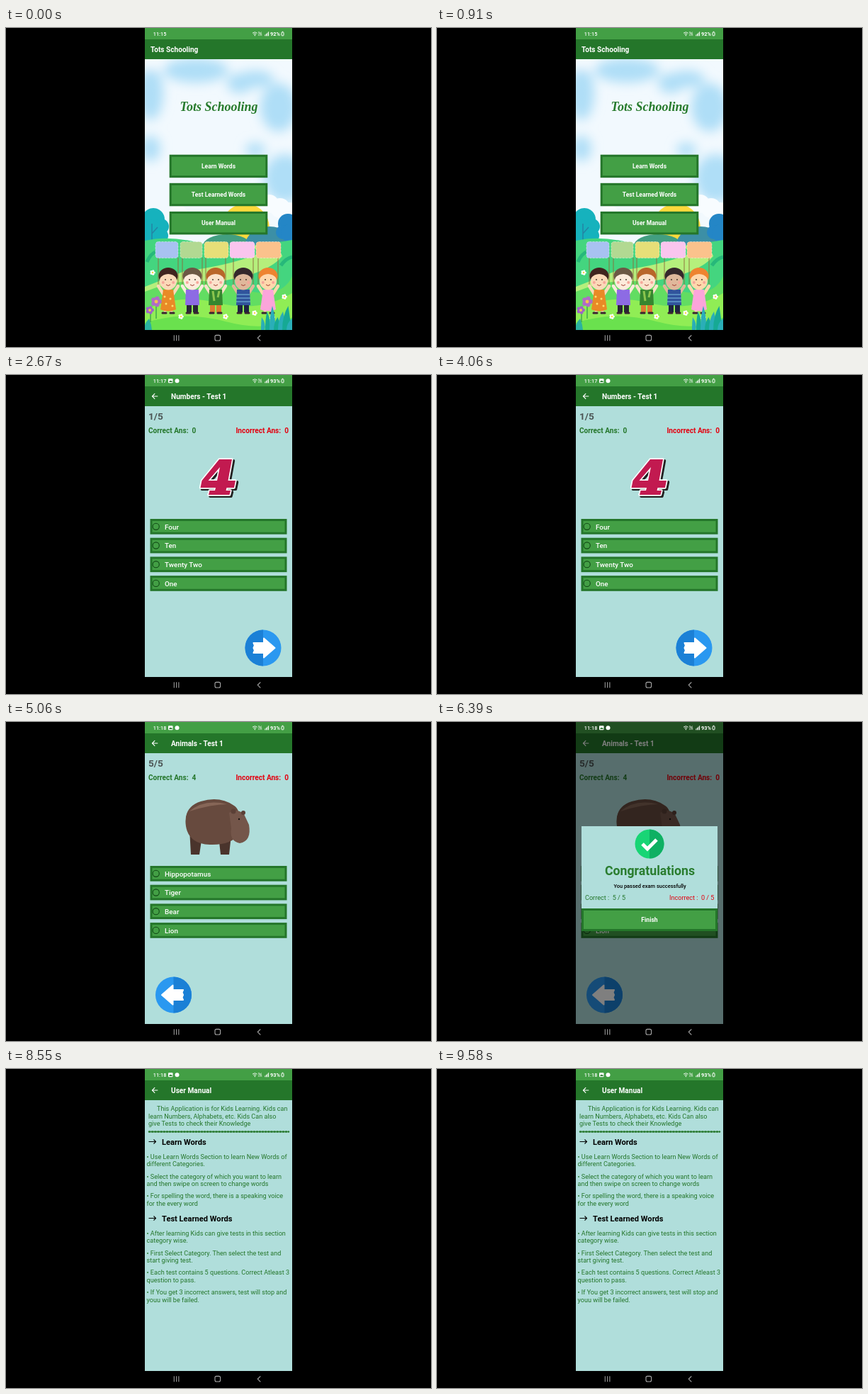
Animation of 600 by 450 pixels, one loop 9.61 s. Source, as an HTML page:

```html
<!DOCTYPE html>
<html lang="en">
<head>
<meta charset="utf-8">
<title>Tots Schooling</title>
<style>
html, body { margin: 0; width: 100%; height: 100%; overflow: hidden; background: #000; }
svg { display: block; width: 600px; height: 450px; font-family: Roboto, sans-serif; }
text { white-space: pre; }
</style>
</head>
<body>
<svg id="stage" viewBox="0 0 600 450"></svg>
<script>
const LOOP = 9610, NAME = 'Tots Schooling';
const LEAF = '#439f45', PINE = '#24762a', TEAL = '#b0dedb', RED = '#e3000f';

const rect = (x, y, w, h, fill, more = '') => `<rect x="${x}" y="${y}" width="${w}" height="${h}" fill="${fill}" ${more}/>`;
const disc = (x, y, r, fill, more = '') => `<circle cx="${x}" cy="${y}" r="${r}" fill="${fill}" ${more}/>`;
const oval = (x, y, rx, ry, fill, more = '') => `<ellipse cx="${x}" cy="${y}" rx="${rx}" ry="${ry}" fill="${fill}" ${more}/>`;
const path = (d, fill, more = '') => `<path d="${d}" fill="${fill}" ${more}/>`;
const line = (d, color, width = 1, more = '') => path(d, 'none', `stroke="${color}" stroke-width="${width}" ${more}`);
const text = (x, y, size, fill, str, weight = 400, anchor = 'start', more = '') =>
  `<text x="${x}" y="${y}" font-size="${size}" fill="${fill}" font-weight="${weight}" text-anchor="${anchor}" ${more}>${str}</text>`;
const each = (list, fn) => list.map(fn).join('');
const framed = (x, y, w, h) =>
  rect(x + 1.5, y + 1.5, w - 3, h - 3, LEAF, `stroke="${PINE}" stroke-width="3"`);

function status(time, level, alerts) {
  let s = text(207.8, 11, 7.3, '#fff', time, 500);
  if (alerts) {
    s += rect(229, 5.2, 6.5, 6, '#fff', 'rx="1"') + path('M230 10l1.8-2.4 1.2 1.2 .8-.8 1.2 2z', PINE) +
      disc(241.5, 8.2, 3, '#fff');
  }
  s += line('M348 7.2q3.3-2.8 6.6 0M349.4 8.8q1.9-1.6 3.8 0', '#fff', 0.9) + disc(351.4, 10.4, 0.8, '#fff');
  s += text(356, 8, 3.4, '#fff', 'Vo)', 500) + text(356, 11.4, 3.4, '#fff', 'LTE', 500);
  s += each([0, 1, 2, 3], i => rect(365.3 + i * 1.6, 9.5 - i * 1.4, 1, 1.8 + i * 1.4, '#fff'));
  return s + text(373, 11, 7.4, '#fff', level + '%', 700) +
    rect(389, 6, 3, 4.8, 'none', 'rx=".7" stroke="#fff" stroke-width="1"') + rect(389.8, 4.8, 1.4, 1, '#fff');
}

function header(title, back) {
  return rect(196, 0, 208, 16, LEAF) + rect(196, 16, 208, 28, PINE) +
    (back ? line('M214.3 30H206.5M210.2 26.2L206.4 30l3.8 3.8', '#fff', 1.1) : '') +
    text(back ? 233 : 204, 34, 10.1, '#fff', title, 700);
}

const page = title => rect(196, 44, 208, 382, TEAL) + header(title, true);

const nav = each([237.3, 240.6, 243.9], x => line(`M${x} 433.3v8`, '#aaa', 1)) +
  rect(295, 433.4, 7.6, 7.6, 'none', 'rx="2" stroke="#aaa" stroke-width="1.1"') +
  line('M359.3 433.3l-4 4 4 4', '#aaa', 1.1);

// Home scenery
function child(x, hair, skin, top, legs, dress) {
  const face = each([-4, 4], d => disc(x + d, 355, 0.9, '#3a2a22') + disc(x + d * 1.8, 359, 2, '#f5a79a'));
  return line(`M${x - 14} 324V364M${x + 14} 324V364`, '#8d6a3c', 0.9) +
    line(`M${x - 7} 375L${x - 14} 364M${x + 7} 375L${x + 14} 364`, skin, 4.5, 'stroke-linecap="round"') +
    line(`M${x - 4.5} 388V401M${x + 4.5} 388V401`, dress ? skin : legs, dress ? 3.5 : 7) +
    line(`M${x - 8} 402h5M${x + 3} 402h5`, '#3a2630', 3, 'stroke-linecap="round"') +
    path(dress ? `M${x - 7} 369h14l4 28q-11 5-22 0z` : `M${x - 9} 369h18l1 22h-20z`, top) +
    oval(x, 350, 13.5, 12, hair) + oval(x, 357, 12, 12.5, skin) +
    path(`M${x - 12} 353q2-12 12-12t12 12q-5-6-12-6t-12 6z`, hair) + face +
    line(`M${x - 3} 362q3 3 6 0`, '#a33c32', 1);
}

const sign = (x, w, color) =>
  rect(x, 301.5, w, 23, color, 'rx="4" stroke="#fff" stroke-opacity=".4" stroke-width="1" stroke-dasharray="3 1.5"');

const flower = (x, y, r, color, core) =>
  each([0, 1, 2, 3, 4], i => disc(x + r * Math.cos(i * 1.257), y + r * Math.sin(i * 1.257), r * 0.7, color)) +
  disc(x, y, r * 0.55, core);

const blade = (x, y, lean, height, color) =>
  path(`M${x - 4} ${y}q0-${height * 0.6} ${4 + lean}-${height}q${5 - lean / 2} ${height * 0.5} 4 ${height}z`, color);

function scenery() {
  const blue = [[204, 92, 18, 38], [268, 60, 46, 17], [330, 78, 18, 14], [385, 112, 26, 34], [352, 72, 26, 12],
    [394, 212, 30, 34], [352, 172, 14, 10], [204, 170, 14, 18]];
  const crown = color => c => disc(...c, color);
  let s = rect(196, 44, 208, 382, '#f2f9fe') +
    `<g filter="url(#soft)">${each(blue, c => oval(...c, '#afdef7'))}${oval(206, 50, 12, 9, '#f7fbfe')}</g>`;
  s += each([[357, 254, 12], [372, 248, 13], [387, 254, 14], [400, 258, 12], [243, 264, 14]], crown('#f8fcff'));
  s += disc(338, 282, 34, '#ffd93c');
  s += oval(312, 307, 34, 16, '#429f80') + oval(372, 306, 34, 26, '#3c8fa6');
  s += each([[208, 270, 16], [219, 280, 11], [202, 288, 18], [218, 293, 11]], crown('#16b2bd'));
  s += line('M206 304V276M206 290l8-9', '#2484a4', 1.5);
  s += each([[398, 276, 14], [391, 288, 10], [403, 290, 14]], crown('#2486c6'));
  s += path('M196 300Q230 292 272 303T404 299V426H196z', '#44d57f') +
    path('M318 303Q362 307 353 320Q310 336 252 343L196 365V385Q250 366 310 356T390 322Q389 309 318 303z', '#b5ef7c') +
    path('M196 372Q262 345 325 366T404 350V426H196z', '#62dd62') +
    path('M196 398Q242 374 300 388T404 374V426H196z', '#90ed55') +
    path('M196 416Q250 398 310 414T404 408V426H196z', '#6ae14e') +
    line('M199 330q5-12 14-15M388 335q7-10 16-12', '#27b87a', 5);
  const signs = [[211, 32, '#a8c2f1'], [246, 31, '#b2d992'], [280, 34, '#e6df78'], [316, 35, '#fac5ee'], [353, 35, '#fbc28c']];
  s += each([[229, '#40251f', '#fbd9b8', '#e98a26', '#fbd9b8', 1], [263, '#6c5845', '#fdebdc', '#8d6be4', '#282634', 0],
    [296, '#b9662a', '#fbe2cb', '#35862f', '#dc7b31', 0], [335, '#35282b', '#dfb89b', '#31549c', '#1e2440', 0],
    [370, '#ee8430', '#ffd8ac', '#fba5da', '#ffd8ac', 1]], c => child(...c));
  s += each(signs, c => sign(...c));
  s += each([[224, 379], [232, 382], [226, 389], [235, 392]], c => disc(...c, 1.5, '#ffe06b'));
  s += line('M326 376h18M325 381h20M325 386h20', '#7dbfdf', 1.2) + line('M292 371l2 14M301 371l-2 9', '#8cc54e', 3);
  s += line('M212 388v22M204 399v16', '#2f9a4b', 1.2) + flower(212, 386, 4.5, '#b06bc8', '#f3c14f') +
    flower(203, 398, 3.5, '#a062c8', '#f3c14f');
  s += each([[207, 345], [310, 407], [351, 402], [376, 408], [393, 379], [247, 407]], c => flower(...c, 2.3, '#fff', '#ffd447'));
  return s + each([0, 1, 2, 3, 4, 5, 6], i =>
    blade(364 + i * 6, 426, (i - 2) * 1.5, 18 + i % 3 * 8, i % 2 ? '#16a994' : '#2aaeb8')) +
    blade(199, 426, 3, 16, '#2bb2a0');
}

const home = scenery() + header(NAME, false) +
  text(300.5, 117, 18, '#267a2b', NAME, 700, 'middle', 'font-style="italic" font-family="Liberation Serif, serif"') +
  each(['Learn Words', 'Test Learned Words', 'User Manual'], (s, i) =>
    framed(230.7, 178.7 + i * 40.1, 138.6, 32.5) + text(300, 198 + i * 40.1, 8.5, '#fff', s, 700, 'middle'));

// Quiz pages
function options(list, picked) {
  return each(list, (s, i) => {
    const y = 203 + i * 26.7;
    return framed(203.5, y, 193, 21.7) +
      disc(211.7, y + 10.8, 4.6, 'none', 'stroke="#114a16" stroke-width="1.1"') +
      (i === picked ? disc(211.7, y + 10.8, 2.4, '#114a16') : '') +
      text(224, y + 14.5, 9.9, '#fff', s, 500);
  });
}

const score = (step, right) => text(201, 63, 13.7, '#4c5555', step + '/5', 700) +
  text(201, 82, 10.1, PINE, 'Correct Ans:  ' + right, 700) +
  text(399, 82, 10.1, RED, 'Incorrect Ans:  0', 700, 'end');

const arrow = disc(363, 385, 25.5, '#2a98f0') + path('M363 359.5a25.5 25.5 0 0 0 0 51z', '#1b80d6') +
  path('M349.5 378H364V371.5L379.5 385 364 398.5V392H349.5l1.5-3.5-1.5-3.5 1.5-3.5z', '#fff',
    'stroke="#fff" stroke-width="2" stroke-linejoin="round"');
const arrowBack = `<g transform="translate(599.5) scale(-1 1)">${arrow}</g>`;

const four = 'M301 119H319L313.5 149H324L322 159H311.5L310.5 163H317L315.5 169H286L287.5 163H295L296 159H274.5L276.5 149ZM298 149L302 130 285.5 149Z';
const numeral = path(four, '#222', 'fill-rule="evenodd" stroke="#222" stroke-width="4" stroke-linejoin="round" transform="translate(2.2 2)"') +
  path(four, '#c21a50', 'fill-rule="evenodd" stroke="#fff" stroke-width="3.4" stroke-linejoin="round" paint-order="stroke"');

const hippo = path('M259 150l2 37h12l3-20 25 2 2 18h12l4-37z', '#4a342c') +
  path('M254 147Q250 120 275 112Q302 104 322 118Q334 126 329 158Q318 174 288 173T254 147z', '#674a3e') +
  path('M259 126Q280 108 312 116Q290 116 259 126z', '#866657') +
  path('M315 128Q326 121 336 130L343 145Q347 168 330 171Q315 168 318 150z', '#74564a') +
  disc(321, 126, 3.5, '#5b4037') + disc(335, 128, 3, '#5b4037') + disc(329, 137, 1.2, '#1b1412');

const numbers = page('Numbers - Test 1') + score(1, 0) + numeral +
  options(['Four', 'Ten', 'Twenty Two', 'One'], -1) + arrow;
const animals = picked => page('Animals - Test 1') + score(5, 4) + hippo +
  options(['Hippopotamus', 'Tiger', 'Bear', 'Lion'], picked) + arrowBack;

const passed = animals(0) + rect(196, 0, 208, 426, '#000', 'opacity=".5"') +
  rect(204, 147, 192, 147, TEAL) +
  disc(300, 172, 20.5, '#18d575') + path('M300 151.5a20.5 20.5 0 0 1 0 41z', '#0fb063') +
  line('M290 172l7 7 13-13', '#fff', 5) +
  text(300.5, 216, 17.7, '#2a7d2f', 'Congratulations', 700, 'middle') +
  text(300.5, 234, 7.45, '#000', 'You passed exam successfully', 500, 'middle') +
  text(209, 251, 9.1, PINE, 'Correct :  5 / 5') +
  text(391.5, 251, 9.1, RED, 'Incorrect :  0 / 5', 400, 'end') +
  framed(204, 263, 192, 32) + text(300, 282, 8.6, '#fff', 'Finish', 700, 'middle');

// Manual page
const prose = (x, y, str) => text(x, y, 9.09, PINE, str);
const topic = (y, str) => line(`M201.5 ${y - 4}h10M208.5 ${y - 7}l3 3-3 3`, '#000', 1.1) + text(220, y, 11.1, '#000', str, 700);
const bullets = (y, list) => each(list, ([a, b], i) =>
  prose(198.5, y + i * 27.7, '• ' + a) + prose(198.5, y + 10.4 + i * 27.7, b));

const manual = page('User Manual') +
  prose(213, 59, 'This Application is for Kids Learning. Kids can') +
  prose(201, 69.5, 'learn Numbers, Alphabets, etc. Kids Can also') +
  prose(201, 80, 'give Tests to check their Knowledge') +
  line('M202 88.5H399', PINE, 2.6, 'stroke-linecap="round" stroke-dasharray="1.5 2.6"') +
  topic(106.5, 'Learn Words') +
  bullets(127, [
    ['Use Learn Words Section to learn New Words of', 'different Categories.'],
    ['Select the category of which you want to learn', 'and then swipe on screen to change words'],
    ['For spelling the word, there is a speaking voice', 'for the every word']]) +
  topic(214.5, 'Test Learned Words') +
  bullets(235, [
    ['After learning Kids can give tests in this section', 'category wise.'],
    ['First Select Category. Then select the test and', 'start giving test.'],
    ['Each test contains 5 questions. Correct Atleast 3', 'question to pass.'],
    ['If You get 3 incorrect answers, test will stop and', 'youu will be failed.']]);

// Start time in ms and content of each screen
const scenes = [
  [0, home + status('11:15', 92, false)],
  [2430, numbers + status('11:17', 93, true)],
  [4790, animals(-1) + status('11:18', 93, true)],
  [6000, animals(0) + status('11:18', 93, true)],
  [6390, passed + status('11:18', 93, true)],
  [8100, manual + status('11:18', 93, true)]
];

const stage = document.getElementById('stage');
stage.innerHTML = `<defs>
  <filter id="soft" x="-20%" y="-20%" width="140%" height="140%"><feGaussianBlur stdDeviation="8"/></filter>
  <clipPath id="phone">${rect(196, 0, 208, 426, '#000')}</clipPath></defs>
  <g clip-path="url(#phone)">${each(scenes, s => `<g class="scene">${s[1]}</g>`)}</g>${nav}`;
const groups = [...stage.querySelectorAll('.scene')];

function draw(now) {
  const t = now % LOOP;
  const current = scenes.filter(s => s[0] <= t).length - 1;
  groups.forEach((g, i) => { g.style.display = i === current ? '' : 'none'; });
}

const start = performance.now();
function tick() {
  draw(performance.now() - start);
  requestAnimationFrame(tick);
}
tick();
</script>
</body>
</html>
```
